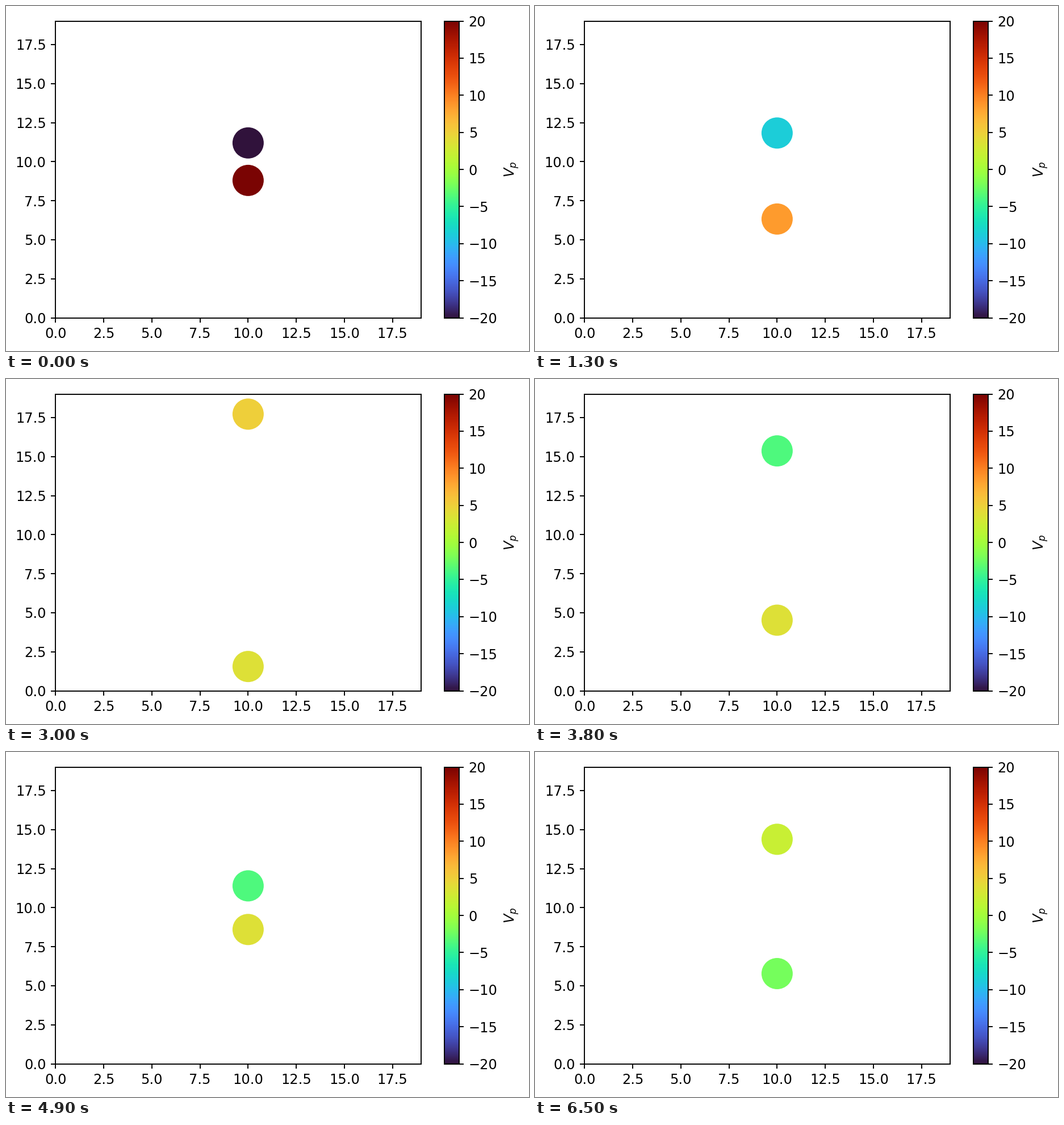
Recreate the animation shown at these times as a matplotlib script. Size 921 by 608 pixels, loop 6.6 s.

```python
import numpy as np
import matplotlib.pyplot as plt
from matplotlib.animation import FuncAnimation
from matplotlib.cm import ScalarMappable
from matplotlib.colors import Normalize

W, H, DPI = 921, 608, 173
FRAMES, STEP = 66, 100
EPS = 1e-6  # guards against the pixel size being rounded down

FLOOR, CEILING, CONTACT = 1, 18.03, 2   # limits for the ball centres
BALL_LOSS, WALL_LOSS = 0.605, 0.705     # restitution of each kind of impact

plt.rcParams.update({"font.family": "DejaVu Sans", "font.size": 10})


def wait(gap, closing):
    """Time until a gap closes, or infinity while it opens."""
    return max(gap, 0) / closing if closing > 0 else np.inf


def state(t):
    """Heights and velocities of both balls after t seconds."""
    y, v = np.array([11.2, 8.8]), np.array([-20, 20.2])
    while True:
        waits = [wait(CEILING - y[0], v[0]),
                 wait(y[1] - FLOOR, -v[1]),
                 wait(y[0] - y[1] - CONTACT, v[1] - v[0])]
        hit = int(np.argmin(waits))
        if waits[hit] > t:
            return y + v * t, v
        t -= waits[hit]
        y = y + v * waits[hit]
        if hit == 2:
            v = v.mean() - BALL_LOSS * (v - v.mean())
        else:
            v[hit] *= -WALL_LOSS


def box(left, top, right, bottom):
    """Pixel edges to a figure rectangle."""
    return [left / W, 1 - bottom / H, (right - left) / W, (bottom - top) / H]


fig = plt.figure(figsize=((W + EPS) / DPI, (H + EPS) / DPI), dpi=DPI,
                 facecolor="white")
ax = fig.add_axes(box(87.4, 26.6, 731.4, 549.6))
ax.set(xlim=(0, 19), ylim=(0, 19))
ticks = np.arange(0, 18, 2.5)
ax.set_xticks(ticks)
ax.set_yticks(ticks)

norm = Normalize(-20, 20)
cax = fig.add_axes(box(771.7, 26.6, 797.9, 549.6))
bar = fig.colorbar(ScalarMappable(norm, "turbo"), cax=cax,
                   ticks=np.arange(-20, 21, 5))
bar.set_label("$V_p$")

balls = ax.scatter([10, 10], [0, 0], c=[0, 0], cmap="turbo", norm=norm,
                   s=(55 * 72 / DPI) ** 2, linewidths=0)


def update(i):
    y, v = state(i * STEP / 1000)
    balls.set_offsets(np.column_stack([[10, 10], y]))
    balls.set_array(v)
    return [balls]


anim = FuncAnimation(fig, update, frames=FRAMES, interval=STEP,
                     repeat=True, repeat_delay=0)
plt.show()
```
